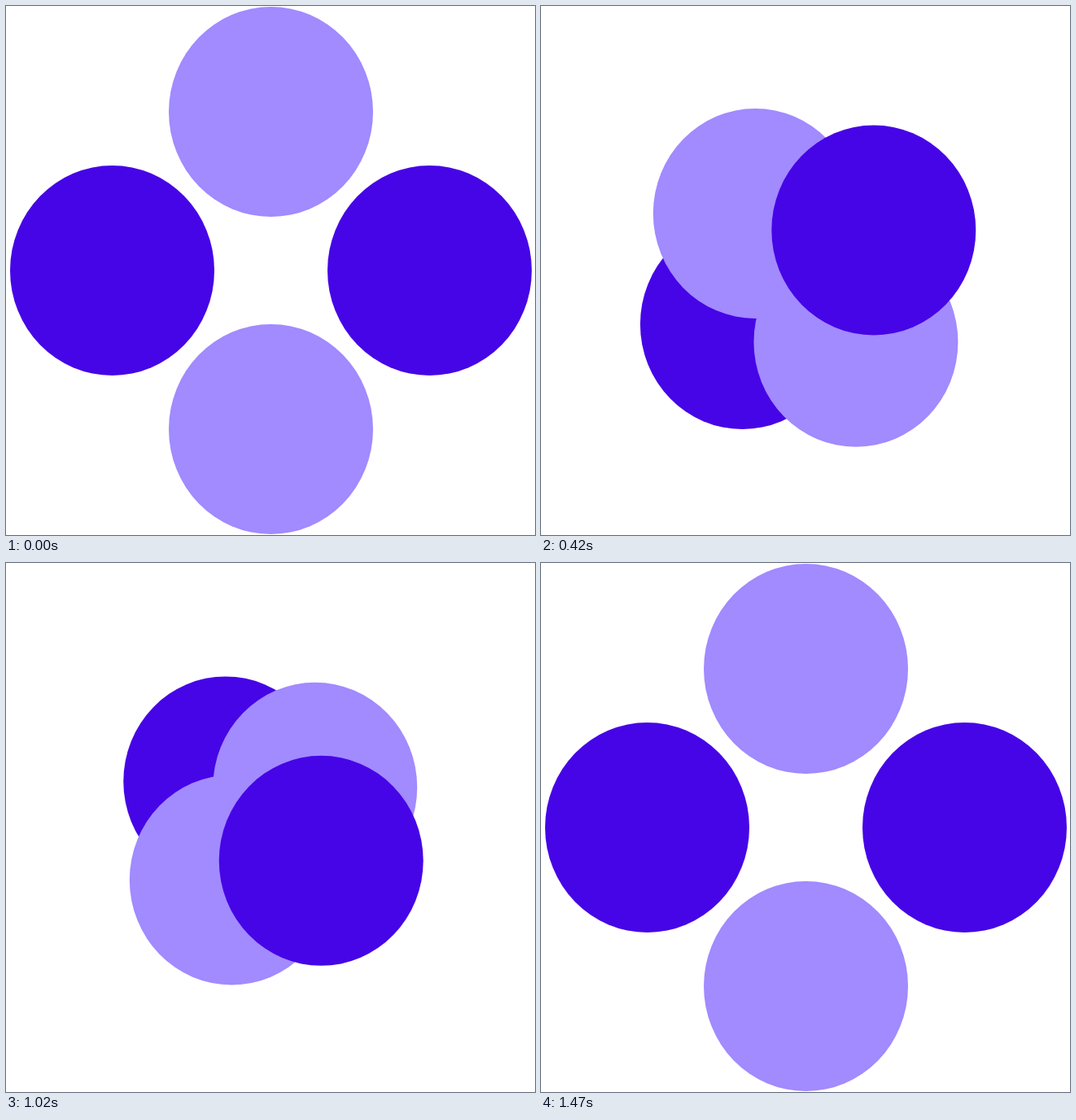
Recreate the animation shown at these times as an HTML page with a canvas. Size 650x650 px, loop 1500 ms.

```html
<!DOCTYPE html>
<html lang="en">
<head>
<meta charset="utf-8">
<title>Four dots</title>
<style>
  html, body { margin: 0; width: 100%; height: 100%; overflow: hidden; background: #fff; }
  canvas { display: block; width: 650px; height: 650px; }
</style>
</head>
<body>
<canvas id="stage" width="650" height="650"></canvas>
<script>
const ctx = document.getElementById('stage').getContext('2d');
const FRAME = 30, LOOP = 1500, MEET = 750, END = 1470;
const CENTER = { x: 325.5, y: 325 }, REACH = 195;
const DARK = '#4605e6', LIGHT = '#a28aff';
const STEPS = 200;

// Back to front. Handles are [along the dot's axis, sideways].
const dots = [
  { axis: [-1, 0], color: DARK,  inward: [110, 161], outward: [102.3, 162] },
  { axis: [0, -1], color: LIGHT, inward: [40, 140.4], outward: [43, 133.5] },
  { axis: [0, 1],  color: LIGHT, inward: [174, 166], outward: [163, 157] },
  { axis: [1, 0],  color: DARK,  inward: [149, 129], outward: [139.5, 126] },
].map(dot => ({ ...dot, inward: makePath(dot.inward), outward: makePath(dot.outward) }));

// Cubic curve from the rim to the centre, sampled with its running length.
function makePath([along, side]) {
  const points = [];
  let length = 0;
  for (let i = 0; i <= STEPS; i++) {
    const s = i / STEPS, r = 1 - s, bend = 3 * s * r * r;
    const u = REACH * r ** 3 + along * bend, v = side * bend;
    const last = points[i - 1];
    if (last) length += Math.hypot(u - last.u, v - last.v);
    points.push({ u, v, length });
  }
  return points;
}

function pointAt(path, fraction) {
  const goal = fraction * path[STEPS].length;
  const i = Math.max(1, path.findIndex(p => p.length >= goal));
  const a = path[i - 1], b = path[i];
  const k = (goal - a.length) / (b.length - a.length);
  return { u: a.u + (b.u - a.u) * k, v: a.v + (b.v - a.v) * k };
}

const ease = t => t * t * (3 - 2 * t);

function draw(time) {
  const goingIn = time < MEET;
  const progress = goingIn ? time / MEET : Math.max(0, (END - time) / (END - MEET));
  ctx.fillStyle = '#fff';
  ctx.fillRect(0, 0, 650, 650);
  for (const { axis: [ax, ay], color, inward, outward } of dots) {
    const { u, v } = pointAt(goingIn ? inward : outward, ease(progress));
    const side = goingIn ? v : -v;
    ctx.fillStyle = color;
    ctx.beginPath();
    ctx.ellipse(CENTER.x + ax * u + ay * side, CENTER.y + ay * u - ax * side, 125.5, 129, 0, 0, 2 * Math.PI);
    ctx.fill();
  }
}

const start = performance.now();
function tick() {
  const time = (performance.now() - start) % LOOP;
  draw(Math.floor(time / FRAME) * FRAME);
  requestAnimationFrame(tick);
}
tick();
</script>
</body>
</html>
```
